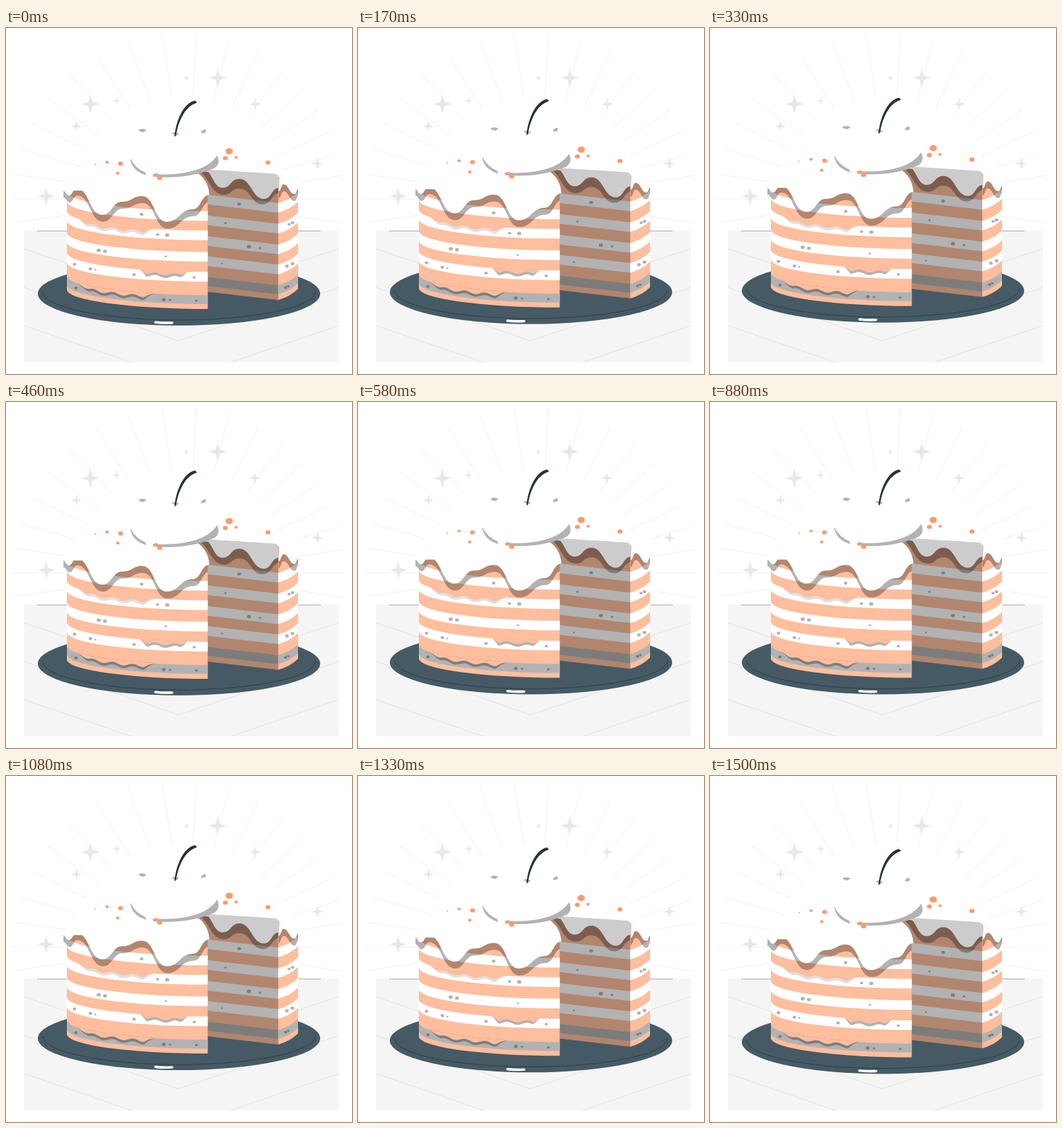
An HTML page for the animation above (1.54 s loop, 500 by 500 pixels).

```html
<!DOCTYPE html>
<html lang="en">
<head>
<meta charset="utf-8">
<title>Floating cake</title>
<style>
  html, body { margin: 0; width: 100%; height: 100%; overflow: hidden; background: #fff; }
  svg { display: block; width: 100vw; height: 100vh; }
</style>
</head>
<body>
<svg viewBox="0 0 500 500">
  <defs>
    <clipPath id="side"><path d="M82 235V260H88V378A203 28 0 0 0 291.500 406V235Z"/></clipPath>
    <clipPath id="cut"><path d="M271 206L340 212L394 226V393L291 381V230Z"/></clipPath>
    <clipPath id="edge"><path d="M393.500 215V393Q411 388 422 377V215Z"/></clipPath>
  </defs>
  <g id="rays" stroke="#ebebeb" stroke-width=".8"></g>
  <g id="stars" fill="#e8e8e8"></g>
  <path d="M26 293H481V483H26Z" fill="#f5f5f5"/>
  <path d="M26 319L249 395L481 319M26 375L249 452L481 375M26 430L181 483M481 430L325 483" fill="none" stroke="#e0e0e0" stroke-width=".9"/>
  <path d="M45 293.300H455" stroke="#455a64" stroke-width=".5"/>
  <g id="cake">
    <ellipse cx="250" cy="384" rx="204" ry="46" fill="#455a64"/>
    <path d="M53 381A197 41 0 0 0 447 381" fill="none" stroke="#263238" stroke-width=".7"/>
    <path d="M216 425.300Q228 426.500 240 426" fill="none" stroke="#fff" stroke-width="3.600" stroke-linecap="round"/>
  </g>
</svg>
<script>
const PEACH = '#ffbe9d', ORANGE = '#ff9a6c', GRAY = '#b2b2b2', WHITE = '#fff', SHADE = 'rgba(0,0,0,.3)';
const { PI, sin, cos, sqrt, min } = Math;
const byId = id => document.getElementById(id);
const add = (id, markup) => byId(id).insertAdjacentHTML('beforeend', markup);
const path = (d, fill) => `<path d="${d}" fill="${fill}"/>`;
const group = (clip, ...body) => `<g clip-path="url(#${clip})">${body.join('')}</g>`;
const shift = (points, dx, dy) => points.map(([x, y]) => [x + dx, y + dy]);
const dot = (x, y, r, fill) => `<ellipse cx="${x}" cy="${y}" rx="${r}" ry="${r * .85}" fill="${fill}"/>`;

let seed = 7;
const random = () => (seed = seed * 16807 % 2147483647) / 2147483647;

// Icing edge through its highest and lowest points, closed by the given tail
const icing = (points, tail, fill) => path(points.map(([x, y], i) => {
  if (!i) return `M${x} ${y}`;
  const [px, py] = points[i - 1], mid = (px + x) / 2;
  return `C${mid} ${py} ${mid} ${y} ${x} ${y}`;
}).join('') + tail + 'Z', fill);

// Sponge with cream layers, the lowest one darker; specks sit on the layers
const layers = (tops, shape) => path('M88 150H460V420H88Z', PEACH) +
  tops.map((y, i) => path(shape(y, 14 - !i), i ? WHITE : GRAY)).join('');
const specks = (tops, columns, lift) => columns.map((xs, i) => xs.map(x =>
  dot(x, tops[i] + lift(x) + 8, 1.4 + 1.7 * random(), SHADE)).join('')).join('');

const sideDrop = x => 28 * sqrt(1 - ((291 - x) / 203) ** 2);
const sideLayer = (y, h) => `M88 ${y}A203 28 0 0 0 291 ${y + 28}h2v${h}h-2A203 28 0 0 1 88 ${y + h}Z`;
const cutDrop = x => (x - 291) * .118;
const cutLayer = (y, h) => `M270 ${y - 2.5}L394 ${y + 12}v${h}L270 ${y + h - 2.5}Z`;
const edgeDrop = x => (393 - x) * .45;
const edgeLayer = (y, h) => `M393 ${y}Q411 ${y - 5} 422 ${y - 16}v${h}Q411 ${y + h - 5} 393 ${y + h}Z`;

// Sponge sagging over the layer below it, with a shadow underneath
function sag(top, from, to, shadow) {
  const outline = thickness => {
    let d = `M${from} ${top + sideDrop(from) - 1}`;
    for (let x = from; x <= to; x++) {
      const t = (x - from) / (to - from);
      const depth = min(1, 7 * t, 7 * (1 - t)) * (4.5 + thickness + 1.8 * sin((x - from) / 4.6));
      d += `L${x} ${top + sideDrop(x) + depth}`;
    }
    for (let x = to; x >= from; x -= 4) d += `L${x} ${top + sideDrop(x) - 1}`;
    return d + 'Z';
  };
  return path(outline(3.8), shadow) + path(outline(0), PEACH);
}

// Rays fan out a little wider at the top right
for (let k = -1; k < 20; k++) {
  const u = k * PI / 18;
  const a = u + (6 * sin(u) ** 2 - 5 * sin(2 * u)) * PI / 180;
  const x = 250 - 240 * cos(a), y = 247 - 240 * sin(a);
  const cx = 262, cy = 247, reach = 1 - .63;
  add('rays', `<path d="M${x} ${y}L${x + (cx - x) * reach} ${y + (cy - y) * reach}"/>`);
}

const stars = [[122, 110, 13], [306, 72, 12.5], [360, 110, 8], [260.5, 72.5, 4.5], [160, 105.5, 5],
  [102, 142, 7], [450, 196, 8], [58, 243, 12]];
for (const [x, y, r] of stars) {
  let d = '';
  for (let i = 0; i < 8; i++) {
    const length = i % 2 ? r * .33 : r, a = i * PI / 4;
    d += `${i ? 'L' : 'M'}${x + length * sin(a)} ${y - length * cos(a)}`;
  }
  add('stars', `<path d="${d}Z" stroke="#e8e8e8" stroke-width=".5" stroke-linejoin="round"/>`);
}

// Cut face
const cutTops = [360, 330, 301, 271, 241];
add('cake', group('cut',
  layers(cutTops, cutLayer), path('M260 190H400V400H260Z', SHADE),
  specks(cutTops, [[], [312], [351, 367], [317], [337]], cutDrop),
  icing([[271, 205], [315, 241], [337, 232], [371, 255], [397, 238]], 'V205', SHADE)));
add('cake', icing([[284, 204], [313, 231], [337, 218], [373, 247], [394.5, 231]], 'V217Q394 211 387 210.500', '#ccc'));

// Outer edge on the right
const edgeTops = [372, 342, 313, 283, 253];
const edgeIcing = [[394, 236], [401, 226], [417, 240], [423, 232]];
add('cake', group('edge',
  layers(edgeTops, edgeLayer),
  specks(edgeTops, [[404, 408], [406, 414], [], [409, 414]], edgeDrop),
  icing(shift(edgeIcing, 0, 10), 'V205H394', SHADE)) +
  icing(edgeIcing, 'V205H395', WHITE));

// Outer side on the left
const sideTops = [358, 324.5, 295.5, 264.5, 236.5];
const sideIcing = [[82, 235], [91, 242], [102, 232], [139, 270], [168, 251], [197, 243], [232, 280], [270, 262], [294, 241]];
add('cake', group('side',
  layers(sideTops, sideLayer),
  sag(sideTops[3], 104, 214, '#e0e0e0'),
  sag(sideTops[1], 194, 262, GRAY),
  sag(sideTops[0], 104, 215, '#7d7d7d'),
  specks(sideTops, [[101, 228, 237, 275], [99, 122, 129, 185, 272], [134, 143, 231], [219, 233], [196]], sideDrop),
  icing(shift(sideIcing, 1, 10), 'V230H83', SHADE)) +
  icing(sideIcing, 'Q292 218 274 208L180 180L95 205', WHITE));

// Cream swirl, stem and crumbs
add('cake',
  path('M179.500 188Q181 206 203 213L201 208.500Q187 203 179.500 188Z', GRAY) +
  path('M212 211C250 214 291 207 305 184Q311 197 300 203Q262 219 213 215Z', GRAY) +
  path('M191 147.500Q197 144 203 147.500L199 150.500Q195 151 191 147.500Z', GRAY) +
  path('M281.500 152Q283 146 289 147L288 151.500Z', GRAY) +
  path('M239 152Q245 149 250 153L246 155.500Z', GRAY) +
  path('M243.500 157C245 138 255 108 273.500 105L276 108C261 112 250 130 245.500 156Z', '#263238'));
const crumbs = [[129, 197, 1.1], [146, 194, 2.4], [165.5, 196, 3.5], [161.5, 210, 2.5], [322.5, 178, 5.3],
  [317, 188, 3.6], [332.5, 187, 2.4], [378.5, 194.5, 3.6], [217, 212, 2.5], [222, 216.5, 3.8]];
add('cake', crumbs.map(crumb => dot(...crumb, ORANGE)).join(''));

const LOOP = 1540, RISE = 10;
function frame(now) {
  const p = ((now + 40) % LOOP) / LOOP;
  const y = .5 - RISE * (1 - Math.abs(2 * p - 1));
  byId('cake').setAttribute('transform', `translate(0 ${y.toFixed(2)})`);
  requestAnimationFrame(frame);
}
requestAnimationFrame(frame);
</script>
</body>
</html>
```
